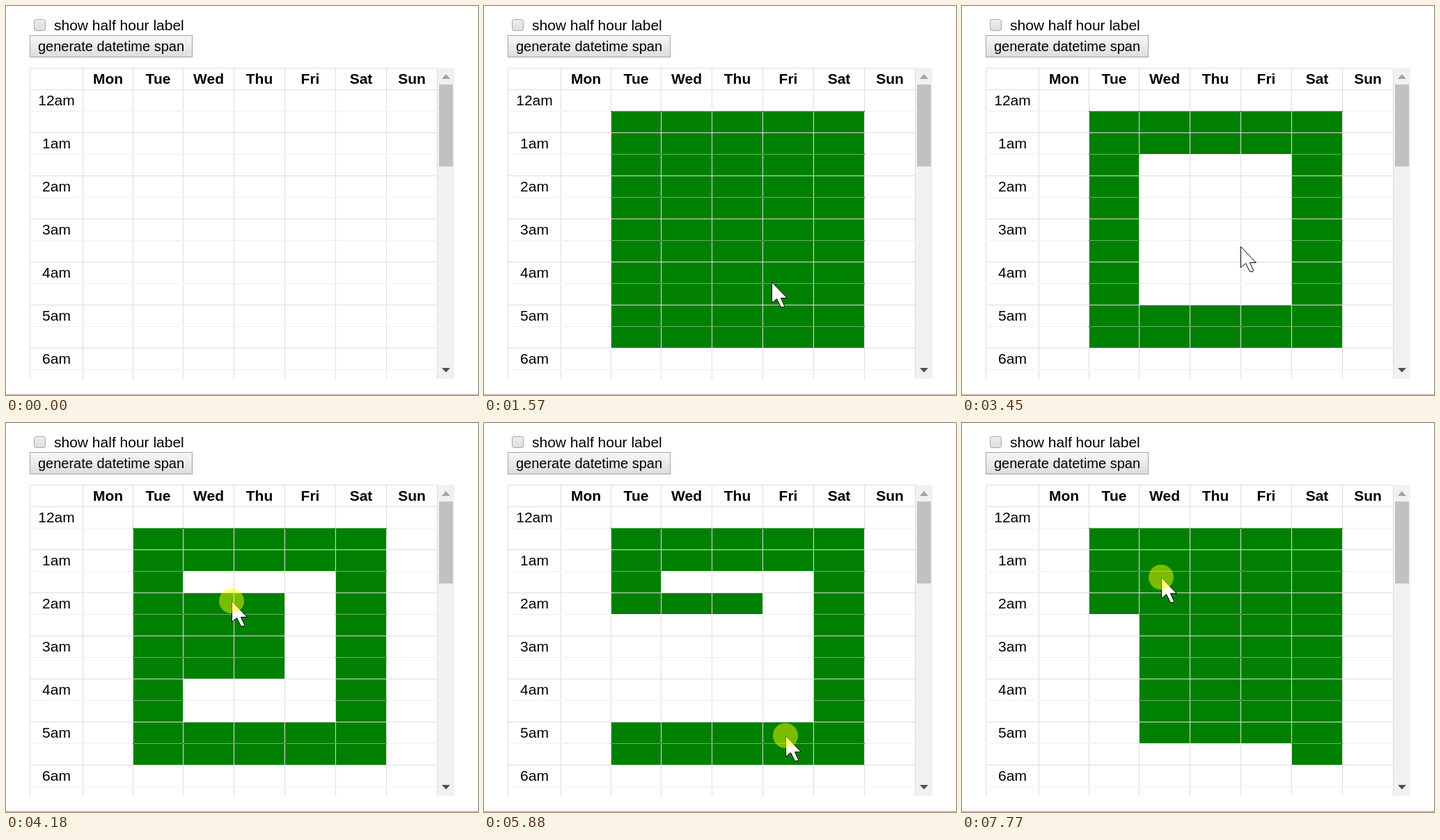
An HTML page with a canvas that plays this animation: 678x560 px, repeating every 8000 ms.

```html
<!DOCTYPE html>
<html lang="en">
<head>
<meta charset="utf-8">
<title>Week schedule</title>
<style>
html, body { margin: 0; width: 678px; height: 560px; overflow: hidden; background: #fff }
canvas { display: block }
</style>
</head>
<body>
<canvas id="stage" width="678" height="560"></canvas>
<script>
const ctx = document.getElementById('stage').getContext('2d');
const LOOP = 8000, TICK = 78.5;
const TOP = 120, ROW = 31, ROWS = 14, BOTTOM = 537;
const COLS = [110, 182, 254, 327, 400, 473, 546, 619];
const DAYS = ['Mon', 'Tue', 'Wed', 'Thu', 'Fri', 'Sat', 'Sun'];
const ENTRY = [249, 447];

// Each stroke: button down and up, then eased moves [start tick, end tick, x, y]
const STROKES = [
  { down: 9, up: 18, moves: [[1, 4, 143, 235], [4, 6, 193, 163], [9, 12, 405, 381], [12, 18, 490, 489]] },
  { down: 25, up: 37, moves: [[19, 24, 276, 234], [25, 28, 486, 415], [29, 31, 462, 440], [32, 36, 444, 423]] },
  { down: 46, up: 61, moves: [[40, 44, 400, 346], [46, 51, 330, 263], [51, 53, 324, 256]] },
  { down: 71, up: 86, moves: [[62, 67, 247, 315], [67, 70, 206, 288], [71, 73, 332, 348], [73, 77, 466, 484]] },
  { down: 92, up: 200, moves: [[87, 91, 440, 447], [92, 99, 286, 222]] }
];
const MOVES = STROKES.flatMap(s => s.moves);

const easeOut = k => 1 - (1 - k) ** 2;

function pointer(n) {
  let [x, y] = ENTRY;
  for (const [from, to, toX, toY] of MOVES) {
    if (n <= from) break;
    const k = easeOut(Math.min(1, (n - from) / (to - from)));
    x += (toX - x) * k;
    y += (toY - y) * k;
  }
  return [Math.round(x), Math.round(y)];
}

function cellAt(n) {
  const [x, y] = pointer(n);
  return [COLS.findLastIndex(c => c < x), Math.floor((y - TOP) / ROW)];
}

// Each drag sets its rectangle to the opposite of its first cell; it trails the pointer by a tick.
function selection(n) {
  const cells = DAYS.map(() => Array(ROWS).fill(false));
  for (const { down, up } of STROKES) {
    if (n < down) break;
    const [c0, r0] = cellAt(down);
    const [c1, r1] = cellAt(Math.max(down, Math.min(n, up) - 1));
    const value = !cells[c0][r0];
    for (let c = Math.min(c0, c1); c <= Math.max(c0, c1); c++)
      cells[c].fill(value, Math.min(r0, r1), Math.max(r0, r1) + 1);
  }
  return cells;
}

function box(color, x, y, w, h) {
  ctx.fillStyle = color;
  ctx.fillRect(x, y, w, h);
}

function label(text, x, y, font = '21px', align = 'center') {
  ctx.font = font + ' "Liberation Sans", Arial, sans-serif';
  ctx.textAlign = align;
  ctx.fillStyle = '#000';
  ctx.fillText(text, x, y);
}

function shape(color, path) {
  ctx.fillStyle = color;
  ctx.fill(new Path2D(path));
}

function shade(y0, y1, from, to) {
  const g = ctx.createLinearGradient(0, y0, 0, y1);
  g.addColorStop(0, from);
  g.addColorStop(1, to);
  return g;
}

function drawControls() {
  ctx.beginPath();
  ctx.roundRect(40.5, 19.5, 16, 16, 3);
  ctx.fillStyle = shade(19, 36, '#eee', '#ddd');
  ctx.fill();
  ctx.strokeStyle = '#a6a6a6';
  ctx.stroke();
  label('show half hour label', 69, 35, '21px', 'left');

  box(shade(42, 74, '#f8f8f8', '#dcdcdc'), 34, 42, 234, 32);
  ctx.strokeStyle = '#a3a3a3';
  ctx.strokeRect(34.5, 42.5, 233, 31);
  label('generate datetime span', 151, 65, '20px');
}

function drawGrid(cells) {
  cells.forEach((col, c) => col.forEach((on, r) => {
    if (on) box('#008000', COLS[c], TOP + r * ROW, COLS[c + 1] - COLS[c] + 1, ROW);
  }));

  // Column lines leave a gap where they meet a dotted line
  const line = '#ddd', hour = 2 * ROW;
  for (const x of [34, ...COLS]) {
    for (let y = TOP - ROW; y < BOTTOM; y += hour)
      box(line, x, y + (y > TOP ? 1 : 0), 1, Math.min(hour, BOTTOM - y) - (y > TOP ? 1 : 0));
  }

  box(line, 34, TOP - ROW, 586, 1);
  for (let r = 0; r < ROWS; r++) {
    const y = TOP + r * ROW;
    if (r % 2) {
      for (const [i, x] of [34, ...COLS].slice(0, -1).entries())
        for (let dot = x + 2 - x % 2; dot < COLS[i]; dot += 2) box(line, dot, y, 1, 1);
    } else {
      box(line, 34, y, 586, 1);
      label((r / 2 || 12) + 'am', 72.5, y + 23);
    }
  }
  DAYS.forEach((d, i) => label(d, (COLS[i] + COLS[i + 1] + 1) / 2, 112, 'bold 21px'));
}

function drawScrollbar() {
  box('#f1f1f1', 620, 89, 24, BOTTOM - 89);
  box('#c1c1c1', 622, 113, 20, 118);
  shape('#a3a3a3', 'M626 105L632 98L638 105Z');
  shape('#505050', 'M626 521H638L632 527.5Z');
  box('#a9a9a9', 0, 559, 678, 1);
}

function drawPointer(n) {
  ctx.save();
  ctx.translate(...pointer(n));
  const arrow = 'M.5 .5V30.5L7.5 24.5L13.5 36.5H17.5L18.5 34.5L13.5 23.5H22.5Z';
  shape('#fff', arrow);
  ctx.strokeStyle = '#000';
  ctx.stroke(new Path2D(arrow));
  if (STROKES.some(s => n >= s.down && n < s.up))
    shape('rgba(255,255,0,.48)', 'M-18 0a18 18 0 1 0 36 0a18 18 0 1 0 -36 0Z');
  ctx.restore();
}

function draw(now) {
  // The screen updates in ticks, like a recording
  const n = Math.floor((now % LOOP + 23) / TICK);
  box('#fff', 0, 0, 678, 560);
  drawControls();
  drawGrid(selection(n));
  drawScrollbar();
  if (n > 0) drawPointer(n);
}

const start = performance.now();
function tick() {
  draw(performance.now() - start);
  requestAnimationFrame(tick);
}
tick();
</script>
</body>
</html>
```
